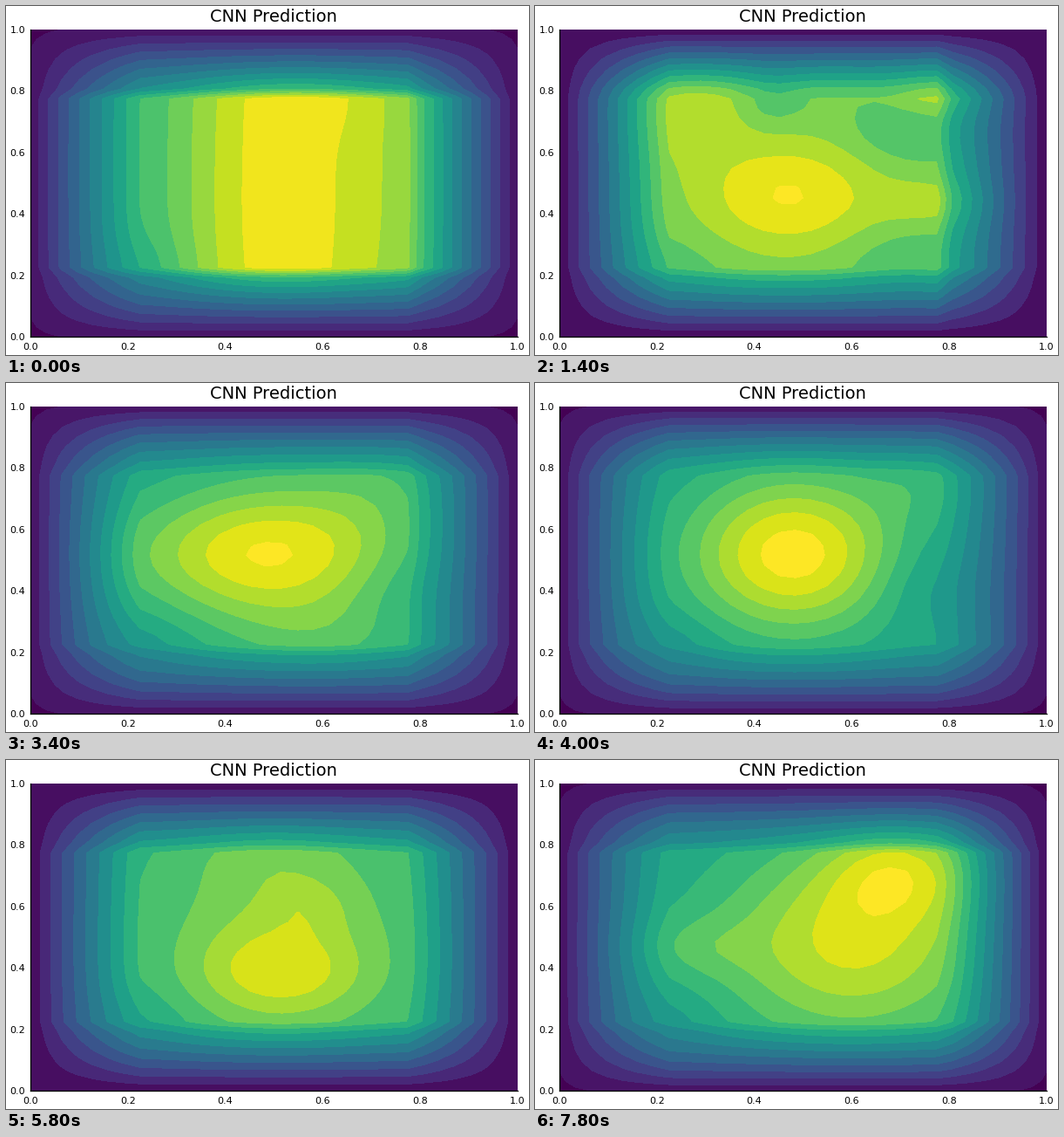
Write a matplotlib script that moves like this. It is 600 px wide and 400 px high and loops after 8 s.

```python
import numpy as np
import matplotlib.pyplot as plt
from matplotlib.animation import FuncAnimation

W, H, DPI = 600, 400, 100
LEFT, RIGHT, TOP, BOTTOM = 28, 587, 27, 379
FRAMES, INTERVAL = 40, 200
RIM = 7 / 31  # width of the ramp around the central square
CORNER_DIP = (0.2, 0.2, -1.1, 0.12, 0.12)

u = np.linspace(0, 1, 32)
X, Y = np.meshgrid(u, u)
CX, CY = np.clip(X, RIM, 1 - RIM), np.clip(Y, RIM, 1 - RIM)


def hill(x, y, height, sx, sy):
    return height * np.exp(-((CX - x) / sx) ** 2 - ((CY - y) / sy) ** 2)


def ramp(p, low, high):
    """Distance into the rim (0..1) and the height reached there."""
    t = np.clip(np.minimum(p, 1 - p) / RIM, 0, 1)
    return t, np.where(t < 0.95, t * np.where(p < 0.5, low, high), 1)


def field(base, mean, sides, corner, hills):
    """Hills on a central plateau, falling to zero at the border.

    Heights count colour bands; sides gives the ramp strength at the
    left, right, bottom and top.
    """
    inner = base + sum(hill(*h) for h in hills + [CORNER_DIP])
    tx, gx = ramp(X, *sides[:2])
    ty, gy = ramp(Y, *sides[2:])
    t = tx * ty
    edge = 0.1 * (1 - t) - corner * np.abs((2 * X - 1) * (2 * Y - 1)) ** 12
    return gx * gy * (mean + t * (inner - mean)) + edge


# Each pose: frame, colour offset, colour step, field
POSES = [
    (0, 0.022, 0.066, field(8.5, 12, (1, 0.96, 0.8, 0.8), 0.5, [
        (0.52, 0.45, 6.2, 0.25, 2.0),
        (0.78, 0.50, 1.6, 0.12, 1.0),
        (0.62, 0.80, 0.5, 0.12, 0.15)])),
    (7, 0.0, 0.077, field(10, 11, (1, 0.9, 0.92, 1.05), 0, [
        (0.47, 0.46, 3.1, 0.19, 0.19),
        (0.28, 0.74, 1.7, 0.10, 0.17),
        (0.44, 0.76, -1.0, 0.06, 0.07),
        (0.70, 0.66, -1.1, 0.10, 0.09),
        (0.76, 0.44, 1.4, 0.10, 0.07),
        (0.77, 0.79, 1.5, 0.08, 0.06),
        (0.70, 0.25, -0.9, 0.12, 0.10)])),
    (13, 0.02, 0.0705, field(8, 11, (1, 0.93, 0.84, 0.9), 0.5, [
        (0.40, 0.52, 5.2, 0.36, 0.19),
        (0.68, 0.60, 3.2, 0.16, 0.28),
        (0.62, 0.24, 3.3, 0.20, 0.14)])),
    (20, 0.025, 0.068, field(7.8, 11.5, (1, 1, 0.95, 1), 0.5, [
        (0.48, 0.52, 6.8, 0.22, 0.26),
        (0.75, 0.42, -0.9, 0.12, 0.14),
        (0.75, 0.75, 1.2, 0.12, 0.12)])),
    (29, 0.0, 0.0752, field(8.2, 10.5, (1, 1, 0.92, 0.92), 0, [
        (0.52, 0.52, 2.8, 0.28, 0.40),
        (0.51, 0.38, 2.3, 0.17, 0.14),
        (0.57, 0.60, 0.9, 0.08, 0.09),
        (0.48, 0.76, 0.6, 0.14, 0.10)])),
    (34, 0.0, 0.0752, field(8.3, 10.5, (1, 0.93, 0.9, 0.9), 0, [
        (0.70, 0.49, 3.0, 0.27, 0.20),
        (0.60, 0.50, 2.0, 0.45, 0.50),
        (0.28, 0.70, -1.6, 0.14, 0.10)])),
    (39, 0.02, 0.069, field(8, 12, (1, 1.03, 0.92, 0.88), 0.5, [
        (0.60, 0.48, 5.3, 0.28, 0.32),
        (0.70, 0.72, 3.4, 0.15, 0.16),
        (0.28, 0.47, 1.2, 0.12, 0.10)])),
]

fig = plt.figure(figsize=(W / DPI, H / DPI), dpi=DPI, facecolor="white")
ax = fig.add_axes([LEFT / W, 1 - BOTTOM / H, (RIGHT - LEFT) / W, (BOTTOM - TOP) / H])
ax.set_xticks([])
ax.set_yticks([])
ax.spines[["top", "right"]].set_visible(False)
ax.spines[["left", "bottom"]].set_linewidth(0.9)


def label(px, py, text, size, ha):
    fig.text(px / W, 1 - py / H, text, fontsize=size, ha=ha, va="baseline",
             family="DejaVu Sans", color="black")


label(306.5, 18.5, "CNN Prediction", 14, "center")
for v in np.linspace(0, 1, 6):
    label(LEFT + v * (RIGHT - LEFT), 394.5, f"{v:.1f}", 8, "center")
    label(22, BOTTOM - v * (BOTTOM - TOP) + 4, f"{v:.1f}", 8, "right")

LEVELS = np.arange(-1, 17)
viridis = plt.get_cmap("viridis")


def draw(i):
    for old in list(ax.collections):
        old.remove()
    k = max(n for n in range(len(POSES) - 1) if POSES[n][0] <= i)
    (start, *a), (end, *b) = POSES[k], POSES[k + 1]
    s = (i - start) / (end - start)
    offset, step, z = [(1 - s) * p + s * q for p, q in zip(a, b)]
    colors = viridis(np.clip(offset + step * (LEVELS[:-1] + 0.5), 0, 1))
    ax.contourf(X, Y, z, levels=LEVELS, colors=colors)
    ax.set_xlim(0, 1)
    ax.set_ylim(0, 1)
    return ax.collections


anim = FuncAnimation(fig, draw, frames=FRAMES, interval=INTERVAL,
                     init_func=lambda: draw(0), repeat=True, repeat_delay=0)
plt.show()
```
